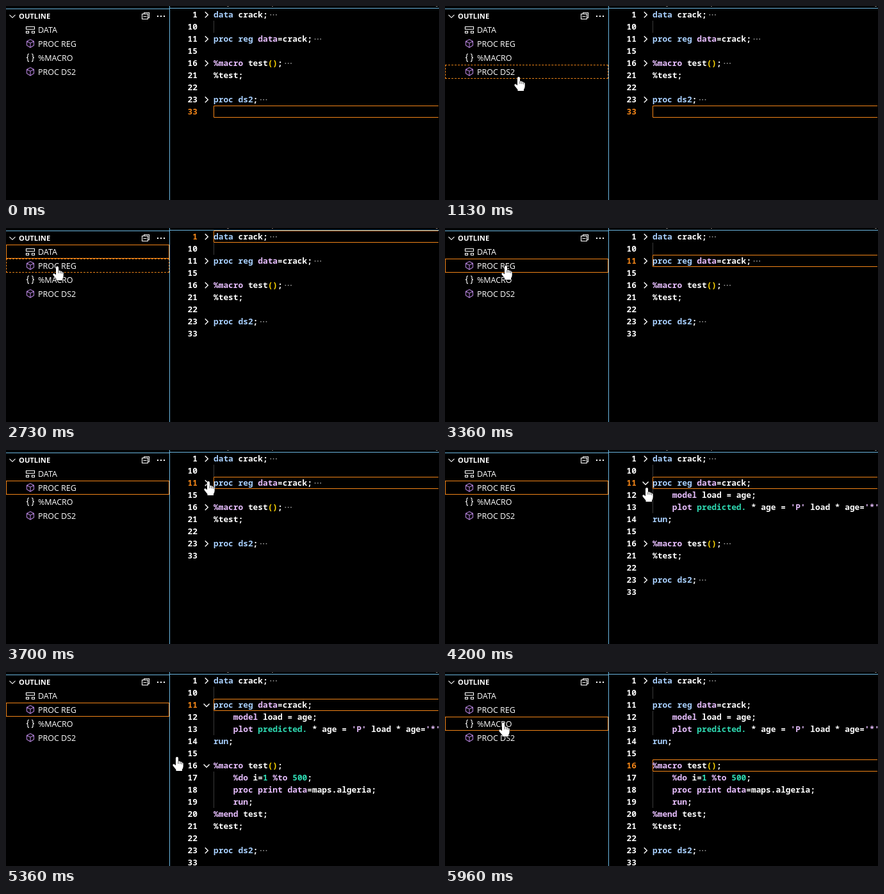
Animation, 676 px wide and 304 px high, one loop 7000 ms. Source, as an HTML page:

```html
<!DOCTYPE html>
<html lang="en">
<head>
<meta charset="utf-8">
<title>Outline and folding</title>
<style>
  html, body { margin: 0; width: 100%; height: 100%; overflow: hidden; background: #000; }
  svg { display: block; width: 676px; height: 304px; }
  text { fill: #fff; white-space: pre; }
  .code text { font: 600 12.83px "Noto Sans Mono", "DejaVu Sans Mono", monospace; }
  .code .num { text-anchor: end; }
  .code .active .num { fill: #f38518; }
  .tree text { font: 500 12.5px "Open Sans", "Noto Sans", sans-serif; }
  .tree .title { font-size: 11.2px; font-weight: 700; }
  .k { fill: #a9d1ff; }
  .m { fill: #e8bfff; font-weight: 700; }
  .o { fill: #e8bfff; }
  .t { fill: #2fdcb4; }
  .y { fill: #ffd700; }
  .b { font-weight: 700; }
  .line, .icon { fill: none; stroke: #fff; stroke-width: 1.1; }
  .code .line { stroke-width: 1.4; }
  .cube { stroke: #b180d7; }
  .border { fill: none; stroke: #6cb8e2; }
  .outline { fill: none; stroke: #f38518; }
  .frame { box-sizing: border-box; width: 255px; height: 22px; border: 1px solid #f38518; }
  .dashed { border-style: dashed; }
  .dots { fill: #999; }
  .guide { stroke: #3a3a3a; }
</style>
</head>
<body>
<svg viewBox="0 0 676 304">
  <rect width="676" height="304"/>
  <g class="code" id="code"></g>
  <g fill="#777"><path d="M345 0h3v1h-3zM415 0h2v1h-2zM671 0h3v1h-3z"/></g>
  <g class="tree" id="tree">
    <path class="border" d="M0 4.5H255M256 3.5H676M255.5 0V304"/>
    <path class="line" d="M5.5 13.8L10 18.3L14.5 13.8"/>
    <text class="title" x="20" y="20">OUTLINE</text>
    <path class="line" d="M215.5 12.5v-2h8v8h-2M212.5 12.5h9v8h-9zM214.5 16.5h5"/>
    <path d="M236 15h2v2h-2zM241 15h2v2h-2zM246 15h2v2h-2z" fill="#fff"/>
  </g>
  <g id="hand" stroke="#000" stroke-linejoin="round">
    <path fill="#fff" paint-order="stroke" d="M-2 2Q-2 0 0 0Q2 0 2 2V7Q3.5 6 5 7.5Q6.7 7 7.6 8.7Q9.5 8.5 9.7 10.5V15Q9.5 18 8 19.5V22H-1.5V20L-6.3 14Q-7.4 12 -5.5 11.2Q-4 11 -2 13.5Z"/>
    <path fill="none" stroke-width=".7" d="M2 7v4M5 7.5v3.7M7.6 8.7v3"/>
  </g>
</svg>
<script>
const LOOP = 7000, ROW = 22, LINE = 19, CHAR = 7.7;
const OPEN = { reg: 3960, macro: 4760 };

const span = cls => s => `<tspan class="${cls}">${s}</tspan>`;
const [k, m, o, t, y, b] = [...'kmotyb'].map(span);

// folds: region this line toggles; inside: region this line belongs to
const lines = [
  { n: 1, code: k('data') + ' crack;', length: 11, folds: 'data' },
  { n: 10, guide: true },
  { n: 11, code: k('proc reg') + o(' data') + '=crack;', length: 20, folds: 'reg' },
  { n: 12, code: o('    model') + ' load = age;', inside: 'reg', guide: true },
  { n: 13, code: o('    plot') + t(' predicted.') + ' * age = ' + o("'P'") + ' load * age=' + o("'*'"), inside: 'reg', guide: true },
  { n: 14, code: k('run') + ';', inside: 'reg' },
  { n: 15 },
  { n: 16, code: m('%macro') + ' test' + y('()') + ';', length: 14, folds: 'macro' },
  { n: 17, code: m('    %do') + ' i=' + t('1') + m(' %to') + t(' 500') + ';', inside: 'macro', guide: true },
  { n: 18, code: o('    proc print data') + '=maps.algeria;', inside: 'macro', guide: true },
  { n: 19, code: o('    run') + ';', inside: 'macro', guide: true },
  { n: 20, code: m('%mend') + ' test;', inside: 'macro' },
  { n: 21, code: b('%test;') },
  { n: 22 },
  { n: 23, code: k('proc ds2') + ';', length: 9, folds: 'ds2' },
  { n: 33 },
];

const cube = '<path class="icon cube" d="M38 -6.5l5.5 2.8v6.4l-5.5 3.3l-5.5 -3.3v-6.4zM32.5 -3.7l5.5 2.9l5.5 -2.9M38 -.8v6.8"/>';
const struct = '<path class="icon" d="M31.5 -4.5h13v4h-13zM31.5 2.5h4v3h-4zM40.5 2.5h4v3h-4z"/>';
const braces = '<path class="icon" d="M36 -6q-2 0 -2 2v2q0 2 -2 2q2 0 2 2v2q0 2 2 2M40 -6q2 0 2 2v2q0 2 2 2q-2 0 -2 2v2q0 2 -2 2"/>';
const items = [[struct, 'DATA'], [cube, 'PROC REG'], [braces, '%MACRO'], [cube, 'PROC DS2']];

function add(parent, html) {
  const g = document.createElementNS('http://www.w3.org/2000/svg', 'g');
  g.innerHTML = html;
  return parent.appendChild(g);
}
const show = (el, on) => { if (el) el.style.display = on ? '' : 'none'; };

for (const line of lines) {
  const end = 324 + (line.length || 0) * CHAR;
  const dots = [4.6, 8.9, 13.2].map(d => `<rect x="${end + d - .8}" y="9" width="1.6" height="1.6"/>`).join('');
  line.el = add(code, `
    ${line.guide ? `<path class="guide" d="M324.5 0V${LINE}"/>` : ''}
    <path class="outline" d="M675 .5H324.5V18.5H675"/>
    <text class="num" x="299" y="14">${line.n}</text>
    <text x="324" y="14">${line.code || ''}</text>
    ${line.folds ? `<g class="closed"><path class="line" d="M310.8 5.2L315.3 9.7L310.8 14.2"/><g class="dots">${dots}</g></g>
      <path class="line opened" d="M308.6 7.8L313.1 12.3L317.6 7.8"/>` : ''}`);
  for (const part of ['outline', 'closed', 'opened']) line[part] = line.el.querySelector('.' + part);
}

const rows = items.map(([icon, label], i) => {
  const el = add(tree, `<foreignObject y="-11" width="255" height="22"><div class="frame"></div></foreignObject>
    ${icon}<text x="50" y="5">${label}</text>`);
  el.setAttribute('transform', `translate(0 ${37 + ROW * i})`);
  return el.querySelector('.frame');
});

const easeOut = u => 1 - (1 - u) ** 1.4;
const smooth = u => u * u * (3 - 2 * u);

// [start, end, x, y, ease]: fingertip arrives at x, y
const moves = [
  [830, 1360, 84, 32, easeOut],
  [2200, 2200, 88, 33, smooth],
  [2430, 2730, 80, 60, smooth],
  [3300, 3700, 316, 49, smooth],
  [4100, 4600, 309, 142, smooth],
  [4850, 5030, 315, 147, smooth],
  [5260, 5600, 91, 79, smooth],
];

function fingertip(now) {
  let x = 183, y = 289;
  for (const [start, end, toX, toY, ease] of moves) {
    if (now < start) break;
    const p = now >= end ? 1 : ease((now - start) / (end - start));
    x += (toX - x) * p;
    y += (toY - y) * p;
  }
  return [Math.round(x), Math.round(y)];
}

// last value whose time has come
const pick = (now, steps) => steps.filter(([at]) => now >= at).pop()[1];

function draw(now) {
  const [x, y] = fingertip(now);
  const pointing = now >= 830;
  show(hand, pointing);
  hand.setAttribute('transform', `translate(${x} ${y})`);

  const hovered = pointing && x < 255 ? Math.floor((y - 26) / ROW) : -1;
  const selected = pick(now, [[0, -1], [1800, 0], [2960, 1], [5960, 2]]);
  rows.forEach((row, i) => {
    show(row, i === hovered || i === selected);
    row.classList.toggle('dashed', i !== selected);
  });

  const current = pick(now, [[0, 33], [1930, 1], [2960, 11], [5960, 16]]);
  const isOpen = region => now >= (OPEN[region] ?? Infinity);
  const overGutter = pointing && x > 256;
  let top = 4;
  for (const line of lines) {
    const visible = !line.inside || isOpen(line.inside);
    show(line.el, visible);
    if (!visible) continue;
    line.el.setAttribute('transform', `translate(0 ${top})`);
    line.el.classList.toggle('active', line.n === current);
    show(line.outline, line.n === current);
    show(line.closed, !isOpen(line.folds));
    show(line.opened, isOpen(line.folds) && overGutter);
    top += LINE;
  }
}

const began = performance.now();
function tick() {
  draw((performance.now() - began) % LOOP);
  requestAnimationFrame(tick);
}
tick();
</script>
</body>
</html>
```
